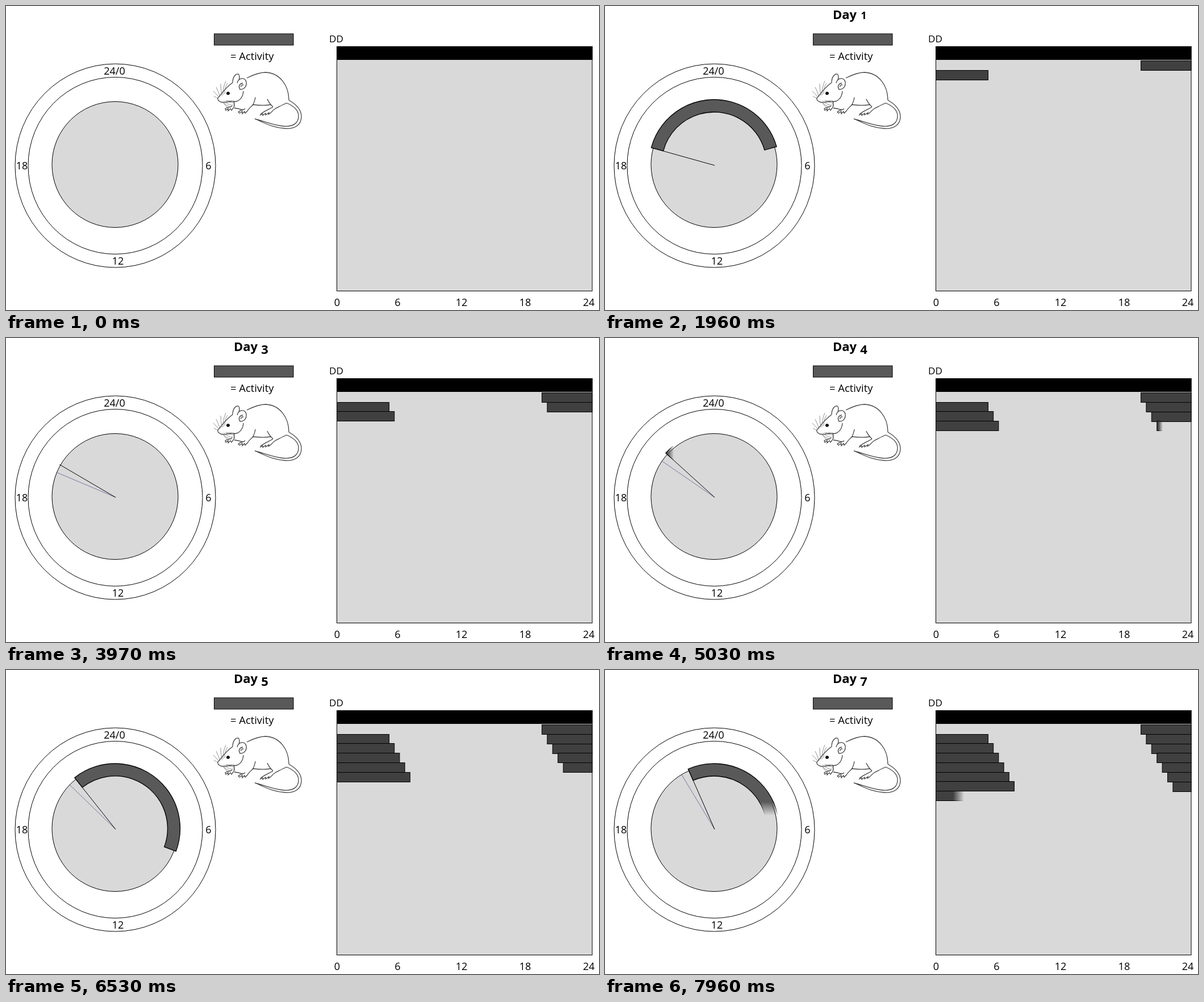
An HTML page with a canvas for the animation above (8000 ms loop, 1044 by 536 pixels).

```html
<!DOCTYPE html>
<html lang="en">
<head>
<meta charset="utf-8">
<title>Free-running activity rhythm</title>
<style>
  html, body { margin: 0; width: 100%; height: 100%; overflow: hidden; background: #fff; }
  canvas { display: block; }
</style>
</head>
<body>
<canvas id="stage" width="1044" height="536"></canvas>
<script>
const ctx = document.getElementById('stage').getContext('2d');
const LOOP = 8000, RAD = Math.PI / 180;
const CX = 192, CY = 279.5, OUTER = 114.5, INNER = 92.5, SWEEP = 149, FEATHER = 0.13;
const FONT = '"Open Sans", "Noto Sans", sans-serif';

// title: when the day begins; wipe: first step; dt: step length; steps: steps to completion;
// angle: activity onset on the dial; trace: where that onset is left as a thin line
const days = [
  { title: 1480, wipe: 1480, dt: 80, steps: 6, angle: -75, trace: -75 },
  { title: 3130, wipe: 3370, dt: 88, steps: 5, angle: -67.5, trace: -67.5 },
  { title: 3970, wipe: 4230, dt: 69, steps: 7, angle: -60, trace: -55.7 },
  { title: 4840, wipe: 5030, dt: 77, steps: 7, angle: -48, trace: -46 },
  { title: 5800, wipe: 6120, dt: 82, steps: 5, angle: -38.5, trace: -38.5 },
  { title: 6660, wipe: 6890, dt: 80, steps: 6, angle: -31, trace: -31 },
  { title: 7570, wipe: 7750, dt: 70, steps: 4.84, angle: -23.5 }
];

const mouse = new Path2D(`
  M424 127 C436 121 446 117 457 117 C482 118 498 140 498 166
  M498 166 C512 174 520 183 520 195 C520 210 508 217 492 216 C470 215 455 206 438 199
  C457 204 473 211 490 212 C506 213 515 206 515 194 C515 183 506 176 494 171
  M494 171 C487 174 480 178 474 181 M460 164 C462 169 466 174 470 178
  M470 178 C462 183 455 185 449 190 L448 192 L452 190 L452 193 L457 189 L457 192 L463 188 L462 191 C467 189 469 184 474 181
  M434 174 C444 175 455 176 466 174
  M439 161 C438 167 437 171 434 175 C430 179 427 181 425 185 L421 189 L420 186 L416 190 L416 186 L411 189 L409 187 C413 183 418 184 421 181
  M402 180 C407 180 412 182 417 183
  M401 167 C402 173 403 178 400 180 L397 184 L395 181 L391 185 L391 181 L387 184 L386 181 C389 178 394 180 398 176
  M399 135 C388 143 381 152 375 160 C372 162 372 166 376 168 C382 173 391 168 398 168 C407 171 417 164 418 150
  M399 135 C399 124 405 119 409 120 C412 122 411 127 410 131
  M407 136 C409 126 421 125 423 134 C424 142 419 148 411 147 M412 146 C409 143 410 137 417 136 M414 143 C413 140 415 139 418 139`);

const whiskers = new Path2D(`
  M380 158 Q378 147 378 137 M382 157 Q382 143 387 132 M377 160 Q373 149 370 143
  M375 161 Q370 155 365 150 M385 155 Q385 143 390 136 M374 163 Q369 161 366 159
  M380 168 Q388 177 397 178 M383 167 Q391 175 400 175 M386 167 Q394 170 401 171
  M382 169 Q386 177 392 180 M388 167 Q395 167 401 168`);

const clamp = v => Math.max(0, Math.min(1, v));

function ink(stroke, width = 1) {
  ctx.strokeStyle = stroke;
  ctx.lineWidth = width;
}

function text(str, x, y, align = 'left', size = 18, weight = 400) {
  ctx.font = `${weight} ${size}px ${FONT}`;
  ctx.textAlign = align;
  ctx.fillStyle = '#000';
  ctx.fillText(str, x, y);
}

function ellipse(x, y, rx, ry, fill) {
  ctx.beginPath();
  ctx.ellipse(x, y, rx, ry, 0, 0, 7);
  ctx.fillStyle = fill;
  ctx.fill();
  ctx.stroke();
}

function box(x, y, w, h, fill) {
  ctx.fillStyle = fill;
  ctx.fillRect(x, y, w, h);
  ctx.strokeRect(x, y, w, h);
}

// Grey tone that is opaque up to a soft edge travelling from one point to the other
function softEdge(x0, y0, x1, y1, tone, p) {
  const g = ctx.createLinearGradient(x0, y0, x1, y1), lead = p * (1 + FEATHER);
  g.addColorStop(clamp(lead - FEATHER), `rgba(${tone},${tone},${tone},1)`);
  g.addColorStop(clamp(lead), `rgba(${tone},${tone},${tone},${p < 1 ? 0 : 1})`);
  return g;
}

function bar(x0, x1, y, p) {
  if (p <= 0) return;
  ink(softEdge(x0 - 1, 0, x1 + 1, 0, 0, p));
  box(x0, y, x1 - x0, 17, softEdge(x0 - 1, 0, x1 + 1, 0, 64, p));
}

function arcHalf(angle, clipX, edge, p) {
  if (p <= 0) return;
  const a = (angle - 90) * RAD, b = a + SWEEP * RAD;
  ctx.save();
  ctx.beginPath();
  ctx.rect(clipX, 0, CX, 536);
  ctx.clip();
  ctx.beginPath();
  ctx.arc(CX, CY, OUTER, a, b);
  ctx.arc(CX, CY, INNER, b, a, true);
  ctx.closePath();
  ctx.fillStyle = softEdge(...edge, 89, p);
  ctx.fill();
  ink(softEdge(...edge, 0, p), 1.3);
  ctx.stroke();
  ctx.restore();
}

function activityArc(angle, before, after) {
  const left = CX + OUTER * Math.sin(angle * RAD);
  const end = (angle + SWEEP) * RAD;
  const bottom = CY - Math.min(OUTER * Math.cos(end), INNER * Math.cos(end));
  arcHalf(angle, 0, [left - 1, 0, CX, 0], before);
  arcHalf(angle, CX, [0, CY - OUTER - 1, 0, bottom + 1], Math.pow(after, 0.67));
}

function hand(angle, length, color, width) {
  ctx.beginPath();
  ctx.moveTo(193, 281);
  ctx.lineTo(CX + length * Math.sin(angle * RAD), CY - length * Math.cos(angle * RAD));
  ink(color, width);
  ctx.stroke();
}

// Old-style figures: 1 and 2 are small, 3, 4, 5 and 7 hang below the baseline
function dayTitle(n) {
  text('Day', 401, 23, 'left', 22, 700);
  text(n, 455.5, n < 3 || n === 6 ? 23 : 27.5, 'center', n < 3 ? 17.5 : 22, 700);
}

function scene() {
  ctx.fillStyle = '#fff';
  ctx.fillRect(0, 0, 1044, 536);
  ink('#000');
  ellipse(192.5, 281.5, 176.5, 179.5, '#fff');
  ellipse(192.5, 281.5, 153.5, 156, '#fff');
  ellipse(CX, CY, 111, 111, '#d9d9d9');
  text('24/0', 191, 121, 'center');
  text('6', 356.5, 288, 'center');
  text('12', 197, 456, 'center');
  text('18', 28, 288, 'center');

  box(366.5, 49, 139.5, 20, '#595959');
  text('= Activity', 395, 95, 'left', 18.4);
  ink('#444', 1.3);
  ctx.stroke(mouse);
  ink('#666', 0.7);
  ctx.stroke(whiskers);
  ink('#000');
  ellipse(391, 154, 2.6, 2.3, '#000');

  box(582.5, 71.5, 449.5, 431, '#d9d9d9');
  box(582.5, 71.5, 449.5, 23, '#000');
  text('DD', 569, 64, 'left', 17);
  [583, 689.5, 802, 914, 1026].forEach((x, i) => text(i * 6, x, 529, 'center'));
}

function draw(t) {
  scene();
  const today = days.filter(d => t >= d.title).length - 1;
  for (let i = 0; i <= today; i++) {
    const d = days[i], step = Math.floor((t - d.wipe) / d.dt);
    const p = step < 0 ? 0 : clamp(0.08 + 0.92 * step / d.steps);
    const before = clamp(p * 2), after = clamp(p * 2 - 1);
    bar(943.5 + 9.4 * i, 1032, Math.round(96 + 16.8 * i) + 0.5, before);
    bar(582.5, 674.5 + 9.2 * i, Math.round(112.6 + 16.75 * i) + 0.5, after);
    if (i < today) continue;
    if (i) hand(days[i - 1].trace, 112, '#75659b', 0.9);
    activityArc(d.angle, before, after);
    hand(d.angle, 113, '#000', 1);
    dayTitle(i + 1);
  }
}

const start = performance.now();
function tick() {
  draw((performance.now() - start) % LOOP);
  requestAnimationFrame(tick);
}
tick();
</script>
</body>
</html>
```
